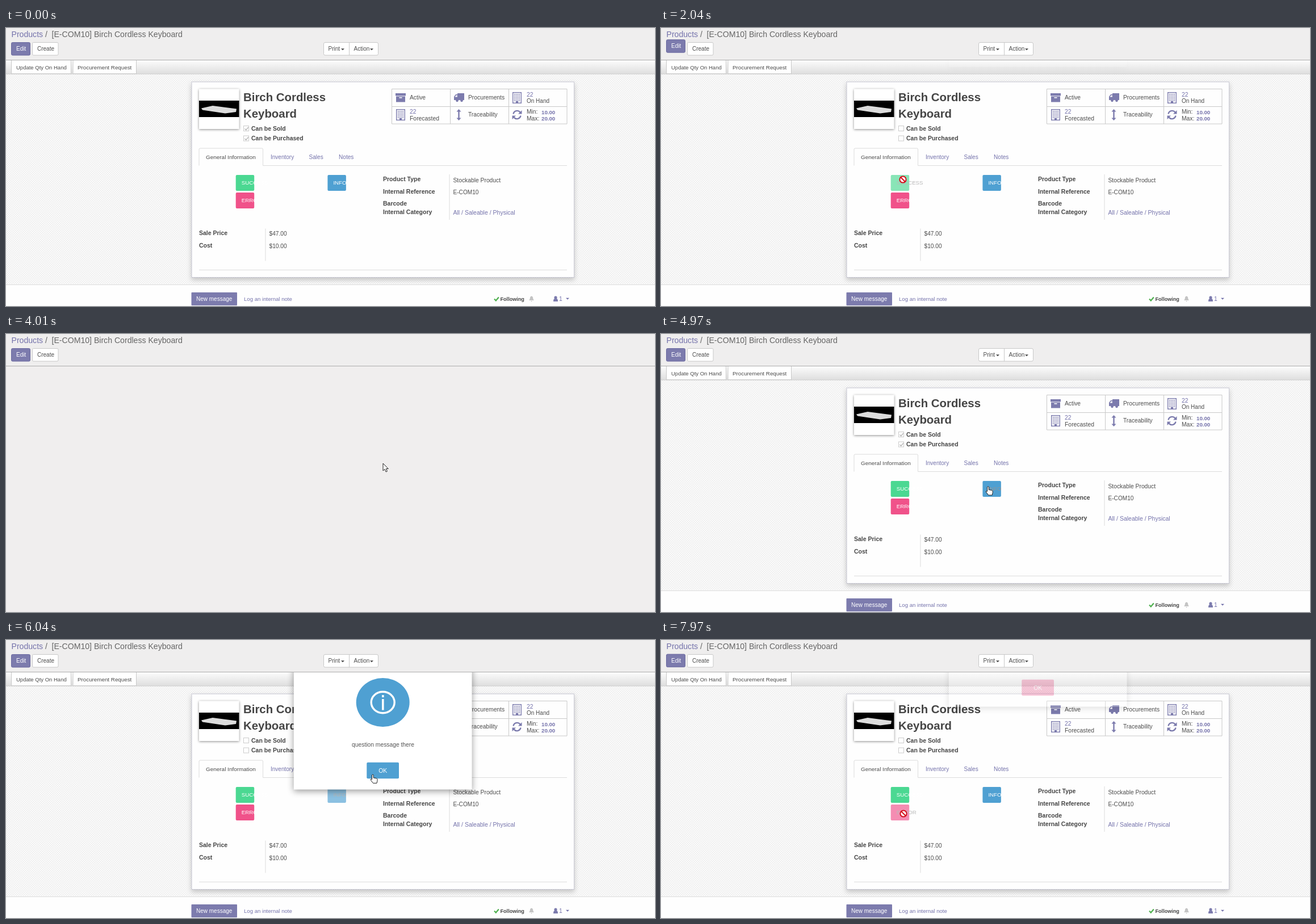
Recreate the animation shown at these times as an HTML page. Size 1143 by 490 pixels, loop 8000 ms.

```html
<!DOCTYPE html>
<html lang="en">
<head>
<meta charset="utf-8">
<title>Product form</title>
<style>
html, body { margin: 0; width: 100%; height: 100%; overflow: hidden; background: #f0eeee; }
svg { display: block; width: 1143px; height: 490px; font-family: "Liberation Sans", Arial, sans-serif; }
text { white-space: pre; }
.sheet { filter: drop-shadow(0 4px 4px rgba(0,0,0,.2)); }
.photo { filter: drop-shadow(0 1px 2px rgba(0,0,0,.45)); }
.panel { filter: drop-shadow(0 3px 6px rgba(0,0,0,.4)); }
</style>
</head>
<body>
<svg id="stage" viewBox="0 0 1143 490"></svg>
<script>
const PURPLE = '#7c7bad', LINK = '#7472ab', DARK = '#4c4c4c', LINE = '#dcdcdc';
const COLORS = ['#4bd892', '#4fa0d2', '#f0528a'];
const MESSAGES = ['success message there', 'question message there', ''];

// Markup helpers
const text = (x, y, s, size = 10.3, fill = DARK, extra = '') =>
  `<text x="${x}" y="${y}" font-size="${size}" fill="${fill}" ${extra}>${s}</text>`;
const bold = (x, y, s, size = 10.5, fill = '#454545') => text(x, y, s, size, fill, 'font-weight="700"');
const rect = (x, y, w, h, fill, extra = '') =>
  `<rect x="${x}" y="${y}" width="${w}" height="${h}" fill="${fill}" ${extra}/>`;
const path = (d, fill = PURPLE, extra = '') => `<path d="${d}" fill="${fill}" ${extra}/>`;
const line = (d, stroke = LINE, w = 1, extra = '') => path(d, 'none', `stroke="${stroke}" stroke-width="${w}" ${extra}`);
const group = (id, body, extra = '') => `<g id="${id}" ${extra}>${body}</g>`;
const caret = (x, y, fill = '#444') => path(`M${x},${y}h6l-3,3z`, fill);

function building(x, y) {
  let s = rect(x + .7, y + .7, 14.6, 18.6, 'none', `stroke="${PURPLE}" stroke-width="1.4"`);
  for (let r = 0; r < 5; r++)
    for (let c = 0; c < 4; c++)
      s += rect(x + 3 + c * 2.8, y + 3 + r * 2.8, 1.6, 1.6, PURPLE);
  return s + rect(x + 6, y + 16, 4, 3, PURPLE);
}

const archive = rect(686, 115, 18, 4.5, PURPLE) + rect(687, 120.5, 16, 10, PURPLE) + rect(692.5, 122, 5, 1.6, '#fff');
const truck = path('M795,115h12v12h-2a2.6,2.6 0 0 1-5,0h-3a2.6,2.6 0 0 1-5,0h-3v-6l3-4h3z') +
  path('M790.5,121.5l2.3-3h2v3z', '#fff') +
  [794.5, 802.5].map(x => `<circle cx="${x}" cy="128" r="2.2" fill="${PURPLE}"/>`).join('');
const upDown = path('M797.5,143l4,4.5h-2.8v11h2.8l-4,4.5l-4-4.5h2.8v-11h-2.8z');
const refresh = line('M893.5,151.5a6.8,6.8 0 0 1 12-3M906.5,154.5a6.8,6.8 0 0 1-12,3', PURPLE, 2.4) +
  path('M908.5,145v6.5h-6.5zM891.5,161v-6.5h6.5z');

const actionButton = (i, x, y, s) => group('act' + i,
  rect(x, y, 32.5, 28, COLORS[i], 'rx="2"') + text(x + 10, y + 17.3, s, 9.7, '#fff', `id="lab${i}"`));

const checkbox = y => rect(418.5, y + .5, 9, 9, '#fff', 'stroke="#ccc"');

const header =
  rect(0, 0, 1143, 56, '#efeeee') + rect(0, 56, 1143, 1, '#adadad') +
  text(9.5, 15.5, 'Products', 14.1, LINK) + text(69, 15.5, '/', 14.1, '#666') +
  text(80.5, 15.5, '[E-COM10] Birch Cordless Keyboard', 14.1, '#666') +
  group('edit', rect(9.5, 25.5, 33, 22.5, PURPLE, 'rx="2" stroke="#6a69a0"') + text(18, 40, 'Edit', 10, '#fff')) +
  rect(46.5, 25.5, 45.5, 22.5, '#fff', 'rx="2" stroke="#c8c8c8"') + text(55, 40, 'Create', 10);

const toolbar =
  rect(559.5, 25.5, 96, 22.5, '#fff', 'rx="2.5" stroke="#c8c8c8"') + line('M604.5,25.5v22.5', '#c8c8c8') +
  text(567.5, 40, 'Print', 10) + caret(590, 36.2) + text(612.5, 40, 'Action', 10) + caret(641, 36.2) +
  rect(0, 57, 1143, 24, 'url(#bar)') + rect(0, 80.5, 1143, 1, '#cfcfcf') +
  rect(9.5, 56.5, 105, 24, '#fff', 'stroke="#c8c8c8"') + text(18, 72.5, 'Update Qty On Hand', 9.5) +
  rect(118, 56.5, 111.5, 24, '#fff', 'stroke="#c8c8c8"') + text(126, 72.5, 'Procurement Request', 9.8) +
  rect(0, 56, 1143, 1, '#adadad');

const sheet =
  rect(0, 81.5, 1143, 371, 'url(#weave)') +
  rect(327, 95, 673.5, 344.5, '#fefefe', 'stroke="#c8c8d3" class="sheet"') +
  rect(340, 107.5, 70.5, 70.5, '#fff', 'class="photo"') + rect(340, 128, 70.5, 29, '#000') +
  path('M344,141.5L364,137L406,142.5L405,148L386,150.5L346,144.5z', '#dcdcdc') +
  bold(418, 128.5, 'Birch Cordless', 20.4) + bold(418, 157.5, 'Keyboard', 20.4) +
  checkbox(172) + checkbox(189.5) +
  group('ticks', line('M420.5,177.5l2.2,2.3l4-5M420.5,195l2.2,2.3l4-5', '#aaa', 1.2)) +
  bold(432, 180.5, 'Can be Sold') + bold(432, 198, 'Can be Purchased');

const stats =
  line('M679.5,107.5h308.5v61.5h-308.5zM679.5,138.5h308.5M782.5,107.5v61.5M885.5,107.5v61.5', '#c9c9c9') +
  archive + text(711, 126, 'Active') + truck + text(814, 125.5, 'Procurements') +
  building(892, 113) + text(917, 120.5, '22', 10.3, LINK) + text(917, 132, 'On Hand', 10) +
  building(687, 143) + text(711, 151, '22', 10.3, LINK) + text(711, 162.5, 'Forecasted', 10.4) +
  upDown + text(814, 156.3, 'Traceability', 10.2) + refresh +
  text(917, 151, 'Min:') + bold(943, 151.5, '10.00', 9.7, LINK) +
  text(917, 162.5, 'Max:') + bold(943, 162.5, '20.00', 9.7, LINK);

const details =
  line('M340,242.5V214q0,-2 2,-2H450.5q2,0 2,2V242.5H988') +
  text(352, 231, 'General Information', 9.95) + text(466, 231, 'Inventory', 10, LINK) +
  text(533.5, 231, 'Sales', 10.1, LINK) + text(586, 231, 'Notes', 10.1, LINK) +
  actionButton(0, 404.7, 259, 'SUCCESS') + actionButton(2, 404.7, 290, 'ERROR') + actionButton(1, 566.4, 259, 'INFO') +
  bold(664, 270, 'Product Type') + bold(664, 292, 'Internal Reference') +
  bold(664, 313, 'Barcode') + bold(664, 328, 'Internal Category') +
  line('M781,258v80M457,353.5v57M340,426.5h648') +
  text(787.5, 271.5, 'Stockable Product') + text(787.5, 293.3, 'E-COM10', 10.1) +
  text(787.5, 329.3, 'All / Saleable / Physical', 10.5, LINK) +
  bold(340, 365, 'Sale Price') + bold(340, 387, 'Cost') +
  text(463.5, 366.3, '$47.00', 10.2) + text(463.5, 388.2, '$10.00', 10.2);

const chatter =
  rect(0, 452.5, 1143, 37.5, '#fefefe') + rect(0, 452, 1143, 1, LINE) +
  rect(326.5, 466, 80.5, 23, PURPLE, 'rx="1"') + text(335, 481, 'New message', 10, '#fff') +
  text(419, 481, 'Log an internal note', 9.6, LINK) +
  line('M860,477.5l2.8,3l5-6', '#4fb04f', 2.2) + bold(870.5, 481, 'Following', 9.1) +
  path('M921,480q2,-2 2,-5q.5,-2.5 2.5,-2.5t2.5,2.5q0,3 2,5zM924,481h3l-1.5,1.5z', '#c4c4c4') +
  path('M964,482q0,-5 2.5,-5h3q2.5,0 2.5,5z') + `<circle cx="968" cy="475" r="2.6" fill="${PURPLE}"/>` +
  text(974, 481, '1', 10.3, LINK) + caret(986, 475.8, LINK);

const icons = [
  path('M643,118q4,-3 7.5,-1l4.5,10q9,-28 24,-40q3,-2 5.5,-.5q-15,14 -25,44.5q-4,2 -7,0z', '#fff'),
  '<ellipse cx="663.7" cy="110" rx="20.5" ry="18.7" fill="none" stroke="#fff" stroke-width="3.4"/>' +
  rect(662, 104, 3.6, 19.5, '#fff') + rect(662, 97, 3.6, 4, '#fff'),
  ''
];

const dialog = group('dialog',
  rect(506.8, -160, 313.7, 423.5, '#fff', 'class="panel"') +
  '<ellipse id="disc" cx="663.7" cy="110" rx="47" ry="43"/>' + group('icon', '') +
  text(664, 187.5, '', 10.3, '#555', 'id="msg" text-anchor="middle"') +
  rect(635.3, 215.7, 56.7, 28.6, '', 'id="ok" rx="2"') +
  text(663.7, 233.7, 'OK', 10.4, '#fff', 'text-anchor="middle"'));

const pointers = group('pointer',
  group('arrow', path('M0,0V13l3,-2.7l2.2,4.7l2.2,-1l-2.1,-4.5h4z', '#fff', 'stroke="#222" stroke-width="1"')) +
  group('hand', path('M-1.3,.5q1.3,-1.5 2.6,0v5l5.5,1q2,.8 1.4,4l-1,4.5h-6.5l-4.5,-6q0,-2 2.5,-.6z', '#fff', 'stroke="#222" stroke-width="1"')) +
  group('stop', '<circle r="5.6" fill="#fff" stroke="#d4101c" stroke-width="2"/>' + line('M-4,-4L4,4', '#d4101c', 2)));

document.getElementById('stage').innerHTML = `<defs>
  <linearGradient id="bar" x2="0" y2="1"><stop stop-color="#fcfcfc"/><stop offset="1" stop-color="#dedede"/></linearGradient>
  <pattern id="weave" width="4" height="4" patternUnits="userSpaceOnUse">
    ${rect(0, 0, 4, 4, '#f8f8f8') + rect(0, 0, 1, 1, '#e2e2e2') + rect(2, 2, 1, 1, '#e2e2e2')}</pattern>
  <clipPath id="below">${rect(0, 57, 1143, 433, '#000')}</clipPath></defs>` +
  rect(0, 0, 1143, 490, '#f0eeee') +
  group('page', sheet + stats + details + chatter) + header + group('tools', toolbar) +
  `<g clip-path="url(#below)">${dialog}</g>` + pointers;

// Timeline
const LOOP = 8000, SLIDE = 550, HEIGHT = 207, HOP = 52;
const ALERTS = [
  { kind: 0, from: 1955, to: 4010, press: 3720 },
  { kind: 1, from: 5105, to: 6810, press: 6500 },
  { kind: 2, from: 7770, to: LOOP, press: LOOP }
];
const BLANKS = [[4010, 4240], [6810, 6960]];
const MOVES = [
  [200, 966, 459], [500, 700, 262], [740, 500, 186], [960, 460, 268], [1050, 460, 270], [1580, 424, 267],
  [1810, 424, 267], [2040, 426, 267], [2510, 432, 267], [2600, 510, 262], [3310, 664, 228],
  [4640, 664, 228], [4710, 571, 266], [4870, 576, 269], [5700, 576, 269], [6120, 662, 230],
  [6960, 662, 230], [7590, 427, 306], [LOOP, 427, 306]
];
const HOT = [[404, 259], [566, 259], [404, 290]];

const el = id => document.getElementById(id);
const swing = p => .5 - Math.cos(Math.PI * Math.min(1, Math.max(0, p))) / 2;
const show = (id, on) => el(id).setAttribute('display', on ? 'inline' : 'none');
const move = (id, x, y) => el(id).setAttribute('transform', `translate(${x},${y})`);
const inside = ([x, y], left, top, w, h) => x >= left && x <= left + w && y >= top && y <= top + h;

function pointerAt(t) {
  const i = Math.max(1, MOVES.findIndex(m => m[0] > t));
  const [a, b] = [MOVES[i - 1], MOVES[i]];
  const p = Math.max(0, (t - a[0]) / (b[0] - a[0]));
  return [a[1] + (b[1] - a[1]) * p, a[2] + (b[2] - a[2]) * p];
}

// Five hops, each half as high as the one before
function hop(age) {
  const n = Math.floor(age / HOP), p = swing(age / HOP - n);
  return n > 9 ? 0 : -18 / 2 ** (n >> 1) * (n % 2 ? 1 - p : p);
}

let shown = -1;
function setAlert(kind) {
  if (kind === shown) return;
  shown = kind;
  el('disc').setAttribute('fill', COLORS[kind]);
  el('icon').innerHTML = icons[kind];
  el('msg').textContent = MESSAGES[kind];
}

function draw(t) {
  const blank = BLANKS.some(([a, b]) => t >= a && t < b);
  const alert = ALERTS.find(a => t >= a.from && t < a.to);
  const pos = pointerAt(t);
  show('page', !blank);
  show('tools', !blank);
  show('ticks', !alert);
  show('dialog', alert);
  move('edit', 0, alert ? hop(t - alert.from) : 0);

  let cursor = 'arrow';
  HOT.forEach(([x, y], i) => {
    const off = alert && alert.kind === i;
    const over = !blank && t >= 200 && inside(pos, x, y, 33, 28);
    if (over) cursor = off ? 'stop' : 'hand';
    el('act' + i).setAttribute('opacity', off ? .65 : 1);
    el('lab' + i).setAttribute('fill', off || over ? '#959595' : '#fff');
  });

  if (alert) {
    const k = swing((t - alert.from) / SLIDE);
    setAlert(alert.kind);
    move('dialog', 0, (k - 1) * HEIGHT);
    el('dialog').setAttribute('opacity', k);
    el('ok').setAttribute('fill', COLORS[alert.kind]);
    el('ok').setAttribute('opacity', t >= alert.press && t < alert.press + 60 ? .85 : 1);
    if (k === 1 && inside(pos, 635, 216, 57, 28)) cursor = 'hand';
  }
  show('pointer', t >= 200);
  move('pointer', ...pos);
  for (const id of ['arrow', 'hand', 'stop']) show(id, id === cursor);
}

const begin = performance.now();
function tick() {
  draw((performance.now() - begin) % LOOP);
  requestAnimationFrame(tick);
}
tick();
</script>
</body>
</html>
```
